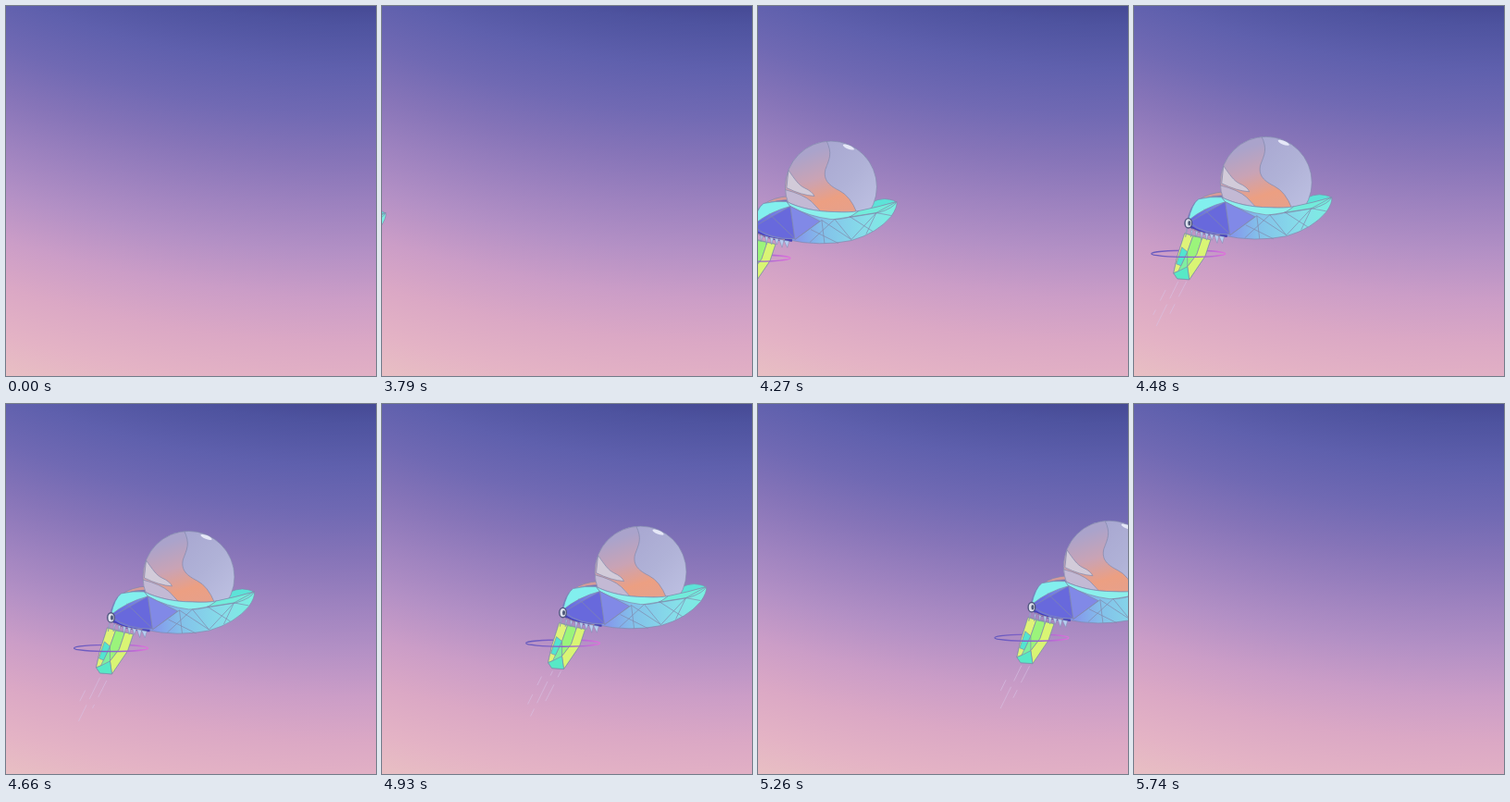
Write an HTML page that moves like this. It is 400 by 400 pixels and loops after 7550 ms.

```html
<!DOCTYPE html>
<html lang="en">
<head>
<meta charset="utf-8">
<title>Drifting orb</title>
<style>
  html, body { margin: 0; width: 100%; height: 100%; overflow: hidden; }
  body {
    background: radial-gradient(circle 1460px at 400px -1000px,
      #464a95 1000px, #4e539f 1020px, #5f60ad 1069px, #7069b3 1118px,
      #8674b8 1167px, #9d82bf 1217px, #b390c5 1266px, #cb9dc7 1316px,
      #dba8c5 1365px, #e4b3c5 1415px, #e8bfc3 1456px);
  }
  svg { display: block; width: 100%; height: 100%; }
</style>
</head>
<body>
<svg viewBox="0 0 400 400">
  <defs>
    <linearGradient id="glass" x1="0" y1="0" x2="1" y2="1">
      <stop offset=".1" stop-color="#a5a3cf"/>
      <stop offset=".55" stop-color="#b0b2d7"/>
      <stop offset="1" stop-color="#c3c6e6"/>
    </linearGradient>
    <linearGradient id="amber" x1=".35" y1="0" x2=".6" y2="1">
      <stop offset=".12" stop-color="#aaa3cb"/>
      <stop offset=".4" stop-color="#c9a3b5"/>
      <stop offset=".65" stop-color="#ec9f82"/>
      <stop offset="1" stop-color="#e2a191"/>
    </linearGradient>
    <linearGradient id="hull" gradientUnits="userSpaceOnUse" x1="-85" y1="0" x2="70" y2="0">
      <stop offset="0" stop-color="#6263dd"/>
      <stop offset=".3" stop-color="#8495ec"/>
      <stop offset=".5" stop-color="#83c2ea"/>
      <stop offset=".8" stop-color="#86dfe9"/>
      <stop offset="1" stop-color="#79efe0"/>
    </linearGradient>
    <linearGradient id="halo" gradientUnits="userSpaceOnUse" x1="-124" y1="0" x2="-44" y2="0">
      <stop offset="0" stop-color="#6258bd"/>
      <stop offset=".6" stop-color="#9465ce"/>
      <stop offset="1" stop-color="#e06fdc"/>
    </linearGradient>
    <clipPath id="ball"><circle r="49.5"/></clipPath>
  </defs>

  <g id="ship" stroke="#8189ad" stroke-width=".7" stroke-linejoin="round" visibility="hidden">
    <!-- far rim -->
    <path d="M-73 19Q-62 11-45 10L-38 22Z" fill="#d69a99"/>
    <path d="M-70 18Q-58 14-44 14L-40 24Z" fill="#7566c0"/>
    <path d="M26 29Q44 13 58 13Q71 14 71 18Q60 26 30 33Z" fill="#5de3d8"/>

    <g clip-path="url(#ball)">
      <circle r="50" fill="url(#glass)" stroke="none"/>
      <path d="M-5-50C2-36-2-30-6-19C-9-7-1-1 9 4Q21 10 28 28L0 52L-52 40V-50Z" fill="url(#amber)"/>
      <path d="M-46-18C-39-8-35-2-29 1Q-20 5-18 10Q-32 9-48 1Z" fill="#d2cbd9"/>
      <path d="M-50 3Q-30 8-21 16Q-11 25-2 40L-50 45Z" fill="#c3b9d4"/>
    </g>
    <circle r="49.5" fill="none"/>
    <ellipse cx="19" cy="-43" rx="6.5" ry="2" transform="rotate(22 19 -43)" fill="#e5e7f7" stroke="none"/>

    <!-- bowl -->
    <path d="M-86 45Q-82 24-73 18Q-60 15-48 16C-34 23-15 27 4 27Q22 28 32 26Q52 22 71 16Q72 22 65 32Q50 50 22 58Q-12 65-48 57Q-78 56-86 45Z" fill="url(#hull)"/>
    <path d="M-84 41Q-80 23-73 18Q-60 15-48 16L-44 21Q-67 27-84 41Z" fill="#82efee"/>
    <path d="M-48 16C-34 23-15 27 4 27Q20 28 30 26Q21 36 0 35Q-24 32-44 21Z" fill="#8bf0ec"/>
    <path d="M30 26Q50 22 71 16Q68 23 51 28L20 33Z" fill="#72ecdb"/>
    <path d="M-83 43L-44 21L-39 56Q-66 57-83 43Z" fill="#6869dc"/>
    <path d="M-44 21L-12 37L-39 57Z" fill="#8189e7"/>
    <path d="M-39 57L-10 36L-7 61M-10 36L22 57L4 35L49 28L22 57M4 35L-23 60M20 32L45 48M49 28L38 51M71 16L49 28L65 31M-67 29L-39 56M-22 46L8 61" fill="none"/>
    <path d="M-83 47Q-67 58-42 58" fill="none" stroke="#4540b5" stroke-width="2.4"/>
    <path d="M-80 50Q-66 57-50 57" fill="none" stroke="#d6a693"/>
    <ellipse cx="-84" cy="44" rx="3.8" ry="5.2" fill="#dce0ed" stroke="#50577e" stroke-width="1.4"/>
    <ellipse cx="-83" cy="44" rx="1.5" ry="2.7" fill="#4d5878" stroke="none"/>

    <!-- crystal -->
    <path d="M-124 77A40 3.6 0 0 1-44 77" fill="none" stroke="url(#halo)" stroke-width="1.4"/>
    <path d="M-88 55L-60 62L-66 80L-83 105L-96 104L-100 98L-96 80Z" fill="#7eefa0"/>
    <path d="M-88 55L-79 58L-85 75L-95 96L-100 98L-96 80Z" fill="#dff379"/>
    <path d="M-79 58L-69 60L-75 78L-85 91L-85 75Z" fill="#9bf47b"/>
    <path d="M-69 60L-60 62L-66 80L-83 105L-85 91L-75 78Z" fill="#d9f574"/>
    <path d="M-100 98L-95 96L-85 91L-83 105L-96 104Z" fill="#57e9c6"/>
    <path d="M-91 70L-85 75L-92 90L-97 88Z" fill="#52e5d0"/>
    <path id="spikes" fill="#b6cdf1" stroke-width=".5"/>
    <path d="M-124 77A40 3.6 0 0 0-44 77" fill="none" stroke="url(#halo)" stroke-width="1.4"/>

    <g id="trails" fill="none" stroke="#d8c4e6" stroke-width=".8" stroke-opacity=".7">
      <path d="M-95 107L-119 156" stroke-dasharray="26 7"/>
      <path d="M-86 107L-104 142" stroke-dasharray="20 9"/>
      <path d="M-107 113L-122 143" stroke-dasharray="13 11"/>
    </g>
  </g>
</svg>
<script>
  const LOOP = 7550, ENTER = 3790, EXIT = 5740, STEP = 30;
  const ship = document.getElementById("ship");
  const trails = document.getElementById("trails");

  let d = "";
  for (let i = 0; i < 8; i++) {
    const x = -86 + i * 5, y = 50 + i * 1.1, lean = (i - 3) * 0.7;
    d += `M${x} ${y}l${lean + 1} ${9 - i % 3}l2 ${i % 3 - 8}Z`;
  }
  document.getElementById("spikes").setAttribute("d", d);

  function draw(now) {
    const time = now % LOOP;
    const visible = time >= ENTER && time < EXIT;
    ship.setAttribute("visibility", visible ? "visible" : "hidden");
    if (visible) {
      const t = Math.floor((time - ENTER) / STEP) * STEP;
      const x = -67 + 0.304 * t;
      const y = 207.5 - 0.0265 * t + 3.3e-6 * t * t;
      ship.setAttribute("transform", `translate(${x} ${y})`);
      trails.setAttribute("stroke-dashoffset", -t * 0.04);
    }
    requestAnimationFrame(draw);
  }
  requestAnimationFrame(draw);
</script>
</body>
</html>
```
